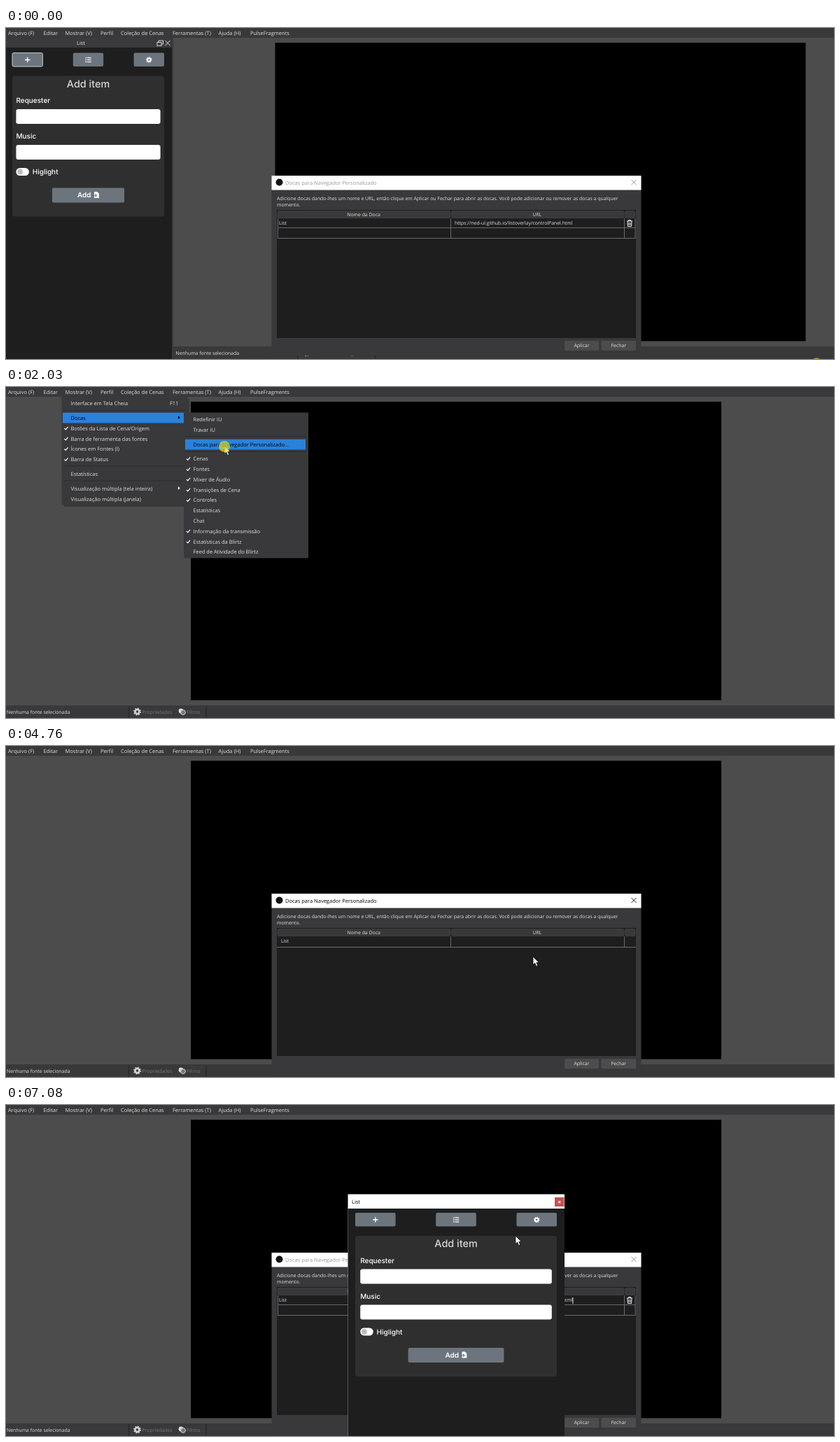
Animation, 1183 px wide and 473 px high, one loop 7.16 s. Source, as an HTML page:

```html
<!DOCTYPE html>
<html lang="pt">
<head>
<meta charset="utf-8">
<title>Docas</title>
<style>
html, body { margin: 0; width: 100%; height: 100%; overflow: hidden; background: #4c4c4c; }
svg { display: block; width: 1183px; height: 473px; }
text { font-family: "Open Sans", "Noto Sans", sans-serif; text-rendering: geometricPrecision; white-space: pre; }
.page text { font-family: Inter, sans-serif; font-weight: 500; }
.item rect { fill: none; }
.item.on rect { fill: #2a82da; }
.item.on text, .item.on path { fill: #000; }
</style>
</head>
<body>
<svg id="stage" viewBox="0 0 1183 473" xmlns="http://www.w3.org/2000/svg"></svg>
<script>
const LOOP = 7160;
const LIGHT = '#e1e0e1', BASE = '#39383a', DARK = '#1f1e1f', STEEL = '#6c757d';
const UI = 7.5, SMALL = 6.88;
const URL_TEXT = 'https://ned-ul.github.io/listoverlay/controlPanel.html';

// Text is placed by the vertical centre of its capitals.
const text = (x, y, str, size = UI, fill = LIGHT, more = '') =>
  `<text x="${x}" y="${y + size * 0.36}" font-size="${size}" fill="${fill}" ${more}>${str}</text>`;
const middle = 'text-anchor="middle"';
const rect = (x, y, w, h, fill, r = 0, more = '') =>
  `<rect x="${x}" y="${y}" width="${w}" height="${h}" rx="${r}" fill="${fill}" ${more}/>`;
const line = (d, color, width = 1) =>
  `<path d="${d}" fill="none" stroke="${color}" stroke-width="${width}"/>`;
const circle = (x, y, r, fill, more = '') =>
  `<circle cx="${x}" cy="${y}" r="${r}" fill="${fill}" ${more}/>`;
const group = (id, body, more = '') => `<g id="${id}" ${more}>${body}</g>`;

const check = (x, y) => line(`M${x - 2.5} ${y}l1.8 1.9 3.3-4`, '#fff', 1.2);
const arrow = (x, y) => `<path d="M${x - 1} ${y - 2.5}l2.6 2.5-2.6 2.5z" fill="#fff"/>`;
const cross = (x, y, r, color, width = 1) =>
  line(`M${x - r} ${y - r}l${2 * r} ${2 * r}m0 ${-2 * r}l${-2 * r} ${2 * r}`, color, width);
const gear = (x, y, r, color) =>
  circle(x, y, r * 0.55, 'none', `stroke="${color}" stroke-width="${r * 0.5}"`) +
  circle(x, y, r * 0.86, 'none',
    `stroke="${color}" stroke-width="${r * 0.28}" stroke-dasharray="${r * 0.86 * Math.PI / 8}"`);
const bullets = (x, y) => [-3, 0, 3].map(d =>
  rect(x - 4, y + d - 0.7, 1.5, 1.5, '#fff') + rect(x - 1.5, y + d - 0.6, 5.7, 1.2, '#fff')).join('');
const trash = (x, y) =>
  line(`M${x - 4} ${y - 3}h8M${x - 1.5} ${y - 3}v-1.5h3v1.5M${x - 3} ${y - 3}l.4 7.5h5.2l.4-7.5` +
    `M${x - 1} ${y - 1}v4M${x + 1} ${y - 1}v4`, '#eee', 1);
const fileIn = (x, y) =>
  `<path d="M${x - 2.5} ${y - 4.6}h4.2l2.6 2.6v6.6h-6.8z" fill="#fff"/>` +
  line(`M${x - 4.5} ${y + 0.8}h5.5m-2-2l2 2-2 2`, STEEL, 1.1);

function menuBar() {
  const labels = [[3, 'Arquivo (F)'], [53.5, 'Editar'], [84.5, 'Mostrar (V)'], [135, 'Perfil'],
    [164, 'Coleção de Cenas'], [238, 'Ferramentas (T)'], [303.5, 'Ajuda (H)'], [349, 'PulseFragments']];
  return rect(0, 0, 1183, 14, BASE) + labels.map(([x, s]) => text(x, 7, s)).join('');
}

function statusBar() {
  const soft = '#77757a';
  return rect(0, 455, 1183, 18, BASE) + group('status',
    text(1, 465, 'Nenhuma fonte selecionada', SMALL) +
    line('M175.5 456v17M286 456v17', '#2a292b', 1.5) +
    gear(187.5, 464, 5.5, '#d0d0d0') + text(194.5, 465, 'Propriedades', SMALL, soft) +
    circle(250, 463, 3.4, '#ddd') + circle(253, 465, 3.4, '#777', 'stroke="#ddd" stroke-width=".9"') +
    text(258, 465, 'Filtros', SMALL, soft));
}

const activeItem = (id, x, y, w, label, tx, extra = '') =>
  group(id, rect(x, y - 7.3, w, 14.8, 'none') + text(tx, y, label) + extra, 'class="item"');

function viewMenu() {
  const rows = [[23, 'Interface em Tela Cheia'], [59, 'Botões da Lista de Cena/Origem', 1],
    [74, 'Barra de ferramenta das fontes', 1], [88.5, 'Ícones em Fontes (I)', 1],
    [103.5, 'Barra de Status', 1], [124, 'Estatísticas'],
    [145, 'Visualização múltipla (tela inteira)'], [160, 'Visualização múltipla (janela)']];
  return rect(83, 17, 179, 154, '#000', 0, 'opacity=".25"') + rect(79.5, 14, 180, 154.5, BASE) +
    line('M82 33.5h175M82 113h175M82 134h175', '#2c2b2d') +
    rows.map(([y, s, on]) => text(92.5, y, s) + (on ? check(86, y) : '')).join('') +
    text(234, 23, 'F11') + arrow(247, 144.5) +
    activeItem('docks', 81, 44, 174, 'Docas', 92.5, arrow(247, 43.5));
}

function dockMenu() {
  const rows = [[46, 'Redefinir IU'], [61, 'Travar IU'], [102.5, 'Cenas', 1], [117.5, 'Fontes', 1],
    [132, 'Mixer de Áudio', 1], [147, 'Transições de Cena', 1], [161.5, 'Controles', 1],
    [176.5, 'Estatísticas'], [191, 'Chat'], [206, 'Informação da transmissão', 1],
    [221, 'Estatísticas da Blirtz', 1], [235.5, 'Feed de Atividade do Blirtz']];
  return rect(254, 36.5, 178, 208, BASE) + line('M256 70.5h174M256 92.5h174', '#2c2b2d') +
    rows.map(([y, s, on]) => text(267.5, y, s) + (on ? check(260.5, y) : '')).join('') +
    activeItem('custom', 256, 82, 172, 'Docas para Navegador Personalizado...', 267.5);
}

function dialog() {
  const grid = '#69686a', head = [[388, 247], [636.5, 246.5], [884.5, 14.5]];
  const button = (id, x, w, label) =>
    rect(x, 447, w, 14, '#4c4c4c', 1.5, `id="${id}"`) + text(x + w / 2, 454, label, SMALL, LIGHT, middle);
  return rect(379.5, 231, 528, 237.5, BASE) + rect(379.5, 211, 528, 20.5, '#fff') +
    circle(390.5, 220.5, 5, '#111') +
    text(399, 221, 'Docas para Navegador Personalizado', UI, '#000', 'id="caption"') +
    group('shut', cross(897, 220.5, 3.5, 'currentColor', 0.9)) +
    text(387, 243.5, 'Adicione docas dando-lhes um nome e URL, então clique em Aplicar ou Fechar para abrir as docas. ' +
      'Você pode adicionar ou remover as docas a qualquer', SMALL) +
    text(387, 252.5, 'momento.', SMALL) +
    rect(387, 260, 513, 183, DARK) +
    head.map(([x, w]) => rect(x, 261.5, w, 10, BASE, 2, 'stroke="#4a494b" stroke-width=".6"')).join('') +
    text(511, 267, 'Nome da Doca', SMALL, LIGHT, middle) + text(759, 267, 'URL', SMALL, LIGHT, middle) +
    group('editRow', line('M387 287.5h513M635.5 272v15.5M883.5 272v15.5', grid)) +
    group('fullRow', line('M388 285.5h511.5M388 300.5h511.5M388.5 272v28.5M635.5 272v28.5M883.5 272v28.5M899 272v28.5', grid) +
      text(641, 279, URL_TEXT, SMALL, LIGHT, 'id="url"') + trash(891, 279)) +
    text(393, 279, '', SMALL, LIGHT, 'id="name"') +
    rect(0, 275, 0.9, 9, '#fff', 0, 'id="caret"') +
    button('apply', 798, 49, 'Aplicar') + button('close', 850.5, 49.5, 'Fechar');
}

// The control page; its layout follows from the card's left, top and width.
function controlPage(x, y, w, focus) {
  const pad = w * 0.025, bw = w * 0.2, mid = x + w / 2, left = x + pad, inner = w - 2 * pad;
  const top = y - 33, cy = top + 10;
  const field = dy => rect(left, y + dy, inner, 21, '#fff', 3);
  return `<g class="page">` +
    [x, mid - bw / 2, x + w - bw].map((bx, i) =>
      rect(bx, top, bw, 19.6, STEEL, 2, focus && !i ? 'stroke="#c3c8cc" stroke-width="1"' : '')).join('') +
    line(`M${x + bw / 2 - 3.7} ${cy}h7.4m-3.7-3.7v7.4`, '#fff', 1.3) +
    bullets(mid, cy) + gear(x + w - bw / 2, cy, 4.2, '#fff') +
    rect(x, y, w, 201, '#302f30', 4) +
    text(mid, y + 11, 'Add item', 14.4, '#d8d8d8', middle) +
    text(left, y + 35, 'Requester', 10, '#fff') + field(47.5) +
    text(left, y + 86, 'Music', 10, '#fff') + field(98.5) +
    rect(left, y + 131.5, 18.5, 11, '#fff', 5.5) + circle(left + 5.7, y + 137, 3.9, '#bdbdbd') +
    text(left + 23.3, y + 137, 'Higlight', 10, '#fff') +
    rect(mid - inner / 4, y + 160, inner / 2, 21, STEEL, 2) +
    text(mid - 15.5, y + 170, 'Add', 10, '#fff', 'style="font-weight:600"') + fileIn(mid + 11, y + 170) + `</g>`;
}

const dock = () => rect(0, 14, 239, 459, '#3a393b') + rect(0, 28, 237, 445, '#1e1e1e') +
  text(107, 21.5, 'List', UI, LIGHT, middle) +
  line('M218 21v-3h6.5v5h-2', '#ddd', 1) + rect(216, 20.5, 6, 4.8, '#3a393b', 0, 'stroke="#ddd"') +
  cross(231, 21.5, 3.7, '#ddd', 1) + controlPage(9, 68.5, 217, true);

const listWindow = () => rect(488.5, 127.5, 309.5, 346, '#fff') +
  text(494, 138, 'List', UI, '#000') +
  rect(784, 132, 13.5, 13, '#c75050') + cross(790.7, 138.7, 1.6, '#fff', 1.1) +
  group('loaded', rect(488.5, 148, 309.5, 325, '#1e1e1e') + group('content', controlPage(499, 187, 288)));

document.getElementById('stage').innerHTML =
  rect(0, 0, 1183, 473, '#4c4c4c') +
  group('preview', rect(264, 21, 758, 426.5, '#000') +
    rect(265, 22, 757, 424.5, 'none', 0, 'id="outline" stroke="#1581ec" stroke-width="1.8"')) +
  menuBar() + statusBar() +
  group('viewMenu', viewMenu()) + group('dockMenu', dockMenu()) +
  group('dialog', dialog()) + group('dock', dock()) + group('listWindow', listWindow()) +
  group('pointer', '<path d="M0 0V11.6L2.7 9.1 4.6 13.7 6.7 12.8 4.8 8.5H8.4Z" fill="#fff" stroke="#000" stroke-width=".7"/>') +
  circle(0, 0, 8, '#dcd62a', 'id="press" opacity=".72"') +
  circle(1158, 480.5, 9, '#e0912c', 'id="corner"');

const el = {};
document.querySelectorAll('[id]').forEach(node => { el[node.id] = node; });
const show = (id, on) => { el[id].style.display = on ? '' : 'none'; };
const within = (t, spans) => spans.some(([a, b]) => t >= a && t < b);
const latest = (t, table) => table.reduce((value, [at, next]) => t >= at ? next : value, table[0][1]);

// start, end, number of steps, destination
const MOVES = [[90, 330, 4, 104, 9], [410, 640, 4, 121, 40], [1260, 1710, 7, 312, 84],
  [2110, 2500, 6, 414, 157], [4300, 4760, 7, 753, 301], [4830, 4990, 3, 747, 283],
  [5540, 6070, 8, 841, 453], [6690, 7080, 6, 728, 187]];
const PRESSES = [[330, 410], [1020, 1110], [2030, 2110], [4990, 5060], [6140, 6220]];
const CARET_ON = [[2110, 2650], [3200, 4300], [4830, 6070], [6690, LOOP]];
const TYPING = [[0, ''], [3200, 'L'], [3450, 'Li'], [3580, 'Lis'], [3750, 'List']];
const VIEW_FADE = [[0, 0], [330, 0.3], [410, 1]];
const DOCK_FADE = [[0, 0], [940, 0.12], [1020, 0.65], [1110, 1]];
const ease = p => p * p * (3 - 2 * p);

function pointerAt(t) {
  let x = 250, y = 130;
  for (const [start, end, steps, toX, toY] of MOVES) {
    if (t < start) break;
    const k = Math.floor((t - start) / (end - start) * (steps - 1) + 1e-6) + 1;
    const p = ease(Math.min(1, k / steps));
    x += (toX - x) * p;
    y += (toY - y) * p;
  }
  return [x, y];
}

function draw(t) {
  const docked = t < 90, hasDialog = docked || t >= 2110, full = docked || t >= 5460;
  const hasWindow = t >= 6220, inactive = docked || hasWindow;
  const [x, y] = pointerAt(t);

  show('dock', docked);
  show('corner', docked);
  show('pointer', !docked);
  el.preview.setAttribute('transform', `translate(${docked ? 120.5 : 0} 0)`);
  el.status.setAttribute('transform', `translate(${docked ? 241.5 : 0} 0)`);

  const menus = t < 2110;
  el.viewMenu.style.opacity = menus ? latest(t, VIEW_FADE) : 0;
  el.dockMenu.style.opacity = menus ? latest(t, DOCK_FADE) : 0;
  el.docks.classList.toggle('on', t >= 940 || y >= 37);
  el.custom.classList.toggle('on', x > 256 && y > 74);

  show('dialog', hasDialog);
  show('outline', !docked && hasDialog && !hasWindow && x > 264 && y < 211);
  el.caption.setAttribute('fill', inactive ? '#999' : '#000');
  el.shut.style.color = inactive ? '#888' : '#000';
  show('editRow', !full);
  show('fullRow', full);
  el.name.textContent = docked ? 'List' : latest(t, TYPING);
  el.name.setAttribute('x', full ? 390 : 393);

  const caret = !docked && within(t, CARET_ON);
  show('caret', caret);
  if (caret) {
    const inUrl = t >= 4990;
    const length = inUrl ? (full ? el.url.getComputedTextLength() : 0)
      : el.name.textContent ? el.name.getComputedTextLength() : 0;
    el.caret.setAttribute('x', (inUrl ? 641 : 393.5) + length);
  }
  const overApply = !docked && hasDialog && x > 798 && x < 847 && y > 447;
  el.apply.setAttribute('fill', overApply ? '#6c6b6d' : '#4c4c4c');

  show('listWindow', hasWindow);
  show('loaded', t >= 6370);
  show('content', t >= 6450);

  el.pointer.setAttribute('transform', `translate(${x} ${y})`);
  show('press', within(t, PRESSES));
  el.press.setAttribute('transform', `translate(${x} ${y + 1})`);
}

function frame() {
  draw(performance.now() % LOOP);
  requestAnimationFrame(frame);
}
frame();
</script>
</body>
</html>
```
